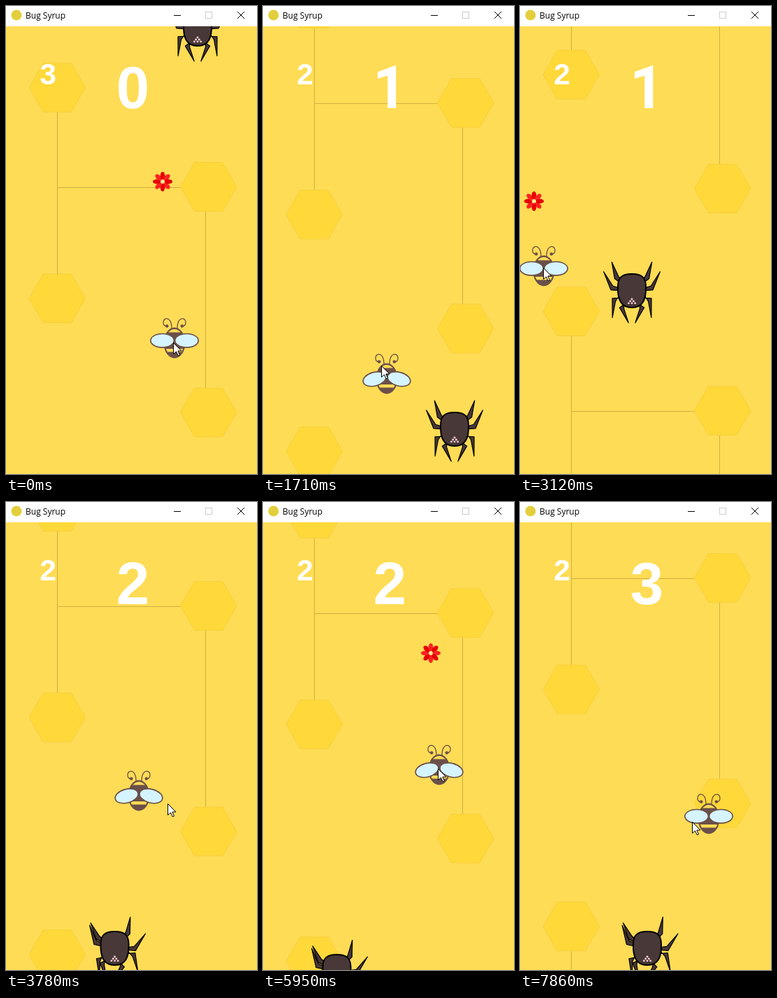
Recreate the animation shown at these times as an HTML page with a canvas. Size 359 by 669 pixels, loop 8000 ms.

```html
<!DOCTYPE html>
<html lang="en">
<head>
<meta charset="utf-8">
<title>Bug Syrup</title>
<style>
html, body { margin: 0; width: 359px; height: 669px; overflow: hidden; background: #ffdc55; }
canvas { display: block; width: 359px; height: 669px; }
</style>
</head>
<body>
<canvas id="stage" width="359" height="669"></canvas>
<script>
const ctx = document.getElementById('stage').getContext('2d');
const LOOP = 8000, BAR = 29, FIELD = 640, TAU = 2 * Math.PI;
const BROWN = '#6b5049', YELLOW = '#ffdc55';

// The screen refreshes every 120 ms, with a 150 ms pause after each run
const refreshes = [];
let next = 0;
for (const run of [5, 12, 3, 3, 4, 2, 4, 4, 8, 1, 2, 2, 2, 1, 2, 5, 1, 1]) {
  for (let i = 0; i < run; i++, next += 120) refreshes.push(next);
  next += 30;
}

// Time to game ticks
const clock = [[0, 0], [870, 27], [2490, 76], [3780, 117], [5040, 154], [6780, 208], [7830, 241], [8000, 246]];

// Time, bee x, bee top
const flight = [
  [0, 241, 446], [200, 237, 452], [870, 197, 614], [1000, 192, 612], [1290, 214, 560],
  [2490, 109, 379], [2600, 110, 378], [2880, 34, 345], [3440, 33, 340],
  [3780, 190, 384], [3900, 239, 402], [5040, 263, 360], [5300, 266, 332], [6500, 240, 360],
  [6780, 241, 476], [7050, 263, 454], [7250, 302, 440], [7530, 302, 430],
  [7830, 270, 417], [8000, 230, 430]];

// x, height at tick 0, last tick
const flowers = [[224, 251, 40], [20, -489, 104], [240, -1240, 200]];
const lanes = [274.5, 160.5, 110.5, 187];

function sample(rows, t) {
  let i = 1;
  while (i < rows.length - 1 && rows[i][0] <= t) i++;
  const a = rows[i - 1], b = rows[i], p = Math.min(1, (t - a[0]) / (b[0] - a[0]));
  return a.slice(1).map((v, j) => Math.round(v + (b[j + 1] - v) * p));
}

function paint(fill, stroke, width) {
  if (fill) { ctx.fillStyle = fill; ctx.fill(); }
  if (stroke) { ctx.strokeStyle = stroke; ctx.lineWidth = width; ctx.stroke(); }
}

function poly(pts, fill, stroke, width = 1) {
  ctx.beginPath();
  for (const [x, y] of pts) ctx.lineTo(x, y);
  ctx.closePath();
  paint(fill, stroke, width);
}

function oval(x, y, rx, ry, turn, fill, stroke, width) {
  ctx.beginPath();
  ctx.ellipse(x, y, rx, ry, turn, 0, TAU);
  paint(fill, stroke, width);
}

function line(x1, y1, x2, y2, color, width = 1) {
  ctx.beginPath();
  ctx.moveTo(x1, y1);
  ctx.lineTo(x2, y2);
  paint(null, color, width);
}

function at(x, y, draw) {
  ctx.save();
  ctx.translate(x, y);
  draw();
  ctx.restore();
}

const polar = (r, deg) => [r * Math.cos(deg * TAU / 360), r * Math.sin(deg * TAU / 360)];

function comb() {
  const color = '#cfb044';
  line(73.5, 152, 73.5, 383, color);
  line(73, 259.5, 250, 259.5, color);
  line(285.5, 293, 285.5, 546, color);
  for (const [x, y] of [[73.3, 116.7], [289.7, 258.5], [73.3, 418], [289.7, 581]]) {
    const corners = [0, 60, 120, 180, 240, 300].map(a => polar(40.3, a));
    poly(corners.map(([dx, dy]) => [x + dx, y + dy]), '#ffd839', '#f6d03f');
  }
}

function flower(turned) {
  if (turned) ctx.rotate(TAU / 8);
  for (let i = 1; i <= 8; i++) {
    const a = i * TAU / 8;
    oval(8.3 * Math.cos(a), 8.3 * Math.sin(a), 5.8, 3.3, a, i % 2 ? '#ff2222' : '#e60000');
  }
  oval(0, 0, 2.8, 2.8, 0, '#ffe79a');
}

// Neighbouring legs swing in opposite directions around the body
function leg(i, swing) {
  const knee = 220 - 33 * i + swing, tip = [235, 214, 126, 96][i] + swing;
  poly([polar(50 - 1.3 * i, tip), polar(30, knee + (i < 2 ? -5 : 5)),
    polar(19, knee - 6), polar(19, knee + 6), polar(28, knee + (i < 2 ? 7 : -7))],
    '#483837', '#000', 1.2);
}

function spider(pose) {
  if (pose < 0) ctx.scale(-1, 1);
  ctx.translate(pose ? -5 : -0.5, 42);
  ctx.lineJoin = 'round';
  for (const side of [1, -1])
    at(0, 0, () => {
      ctx.scale(side, 1);
      for (let i = 0; i < 4; i++) leg(i, pose ? 8.5 * (i % 2 ? 1 : -1) * side : 0);
    });
  ctx.beginPath();
  ctx.moveTo(0, -24);
  ctx.bezierCurveTo(14, -24, 20, -19, 20, -6);
  ctx.bezierCurveTo(20.5, 12, 16, 24, 0, 24);
  ctx.bezierCurveTo(-16, 24, -20.5, 12, -20, -6);
  ctx.bezierCurveTo(-20, -19, -14, -24, 0, -24);
  paint('#483837', '#000', 2);
  for (let row = 0; row < 3; row++)
    for (let i = 0; i <= row; i++)
      oval((i - row / 2) * 4.6, 12 + row * 2.9, 1.5, 1.4, 0, '#f5cdd0');
}

function bee(droop) {
  for (const side of [-1, 1]) {
    ctx.beginPath();
    ctx.moveTo(side * 4, 15);
    ctx.bezierCurveTo(side * 4, 6, side * 7, 0.5, side * 12, 0.8);
    ctx.bezierCurveTo(side * 17, 2, side * 18, 11, side * 11, 12);
    paint(null, BROWN, 1.3);
    oval(side * 10.8, 11.5, 2.3, 2.3, 0, BROWN);
  }
  oval(0, 35.5, 15.5, 22, 0, BROWN);
  ctx.save();
  ctx.beginPath();
  ctx.ellipse(0, 35.5, 13.5, 19.5, 0, 0, TAU);
  ctx.clip();
  ctx.fillStyle = YELLOW;
  ctx.fillRect(-16, 14, 32, 6.5);
  ctx.fillRect(-16, 44, 32, 4.5);
  ctx.restore();
  for (const side of [-1, 1])
    oval(side * 17.4, droop ? 36.3 : 32.3, 16.8, 9.8, droop ? side * 0.26 : 0, '#d5f4ff', BROWN, 1.7);
}

function pointer() {
  poly([[0, 0], [0, 16], [4, 12.5], [6.8, 18.5], [9, 17.5], [6.4, 11.5], [11.5, 11.5]], '#fff', '#000');
}

// A plain 1 without a foot needs another typeface
function digit(value, x, y, size) {
  const family = value === 1 ? 'Roboto' : '"Liberation Sans"';
  ctx.font = `bold ${size}px ${family}, sans-serif`;
  ctx.textAlign = 'center';
  ctx.fillStyle = '#fff';
  ctx.fillText(value, x, y);
}

function titleBar() {
  ctx.fillStyle = '#fff';
  ctx.fillRect(0, 0, 359, BAR);
  oval(15, 13, 7.5, 7.5, 0, '#e3cf3c');
  ctx.font = '12px "Open Sans", sans-serif';
  ctx.textAlign = 'left';
  ctx.fillStyle = '#000';
  ctx.fillText('Bug Syrup', 28, 18);
  line(240, 13.5, 250, 13.5, '#000');
  ctx.strokeStyle = '#ccc';
  ctx.strokeRect(285.5, 8.5, 9, 9);
  line(331, 8, 341, 18, '#000');
  line(341, 8, 331, 18, '#000');
}

function render(t) {
  const [tick] = sample(clock, t);
  const [bx, by] = sample(flight, t);
  const [px, py] = sample(flight, t + 100); // the bee trails the pointer
  const flap = tick % 8 > 3;
  ctx.fillStyle = YELLOW;
  ctx.fillRect(0, 0, 359, 669);

  const scroll = tick * 10 % FIELD;
  at(0, scroll, comb);
  at(0, scroll - FIELD, comb);

  const live = flowers.find(f => tick < f[2]);
  if (live) at(live[0], live[1] + tick * 8, () => flower(flap));

  const pose = [0, -1, 0, 1][Math.floor(tick % 31 / 8)];
  at(lanes[Math.floor(tick / 62)], -9 + tick % 62 * 11, () => spider(pose));
  at(bx, by, () => bee(flap));

  digit(flowers.filter(f => tick >= f[2]).length, 181.5, 145.5, 85);
  digit(tick < 47 ? 3 : 2, 60, 111.5, 42.5);
  titleBar();
  at(px + 0.5, py + 32.5, pointer);
}

let shown = -1;
function loop(now) {
  const t = now % LOOP;
  const step = refreshes.filter(s => s <= t).pop();
  if (step !== shown) render(shown = step);
  requestAnimationFrame(loop);
}
render(0);
requestAnimationFrame(loop);
</script>
</body>
</html>
```
